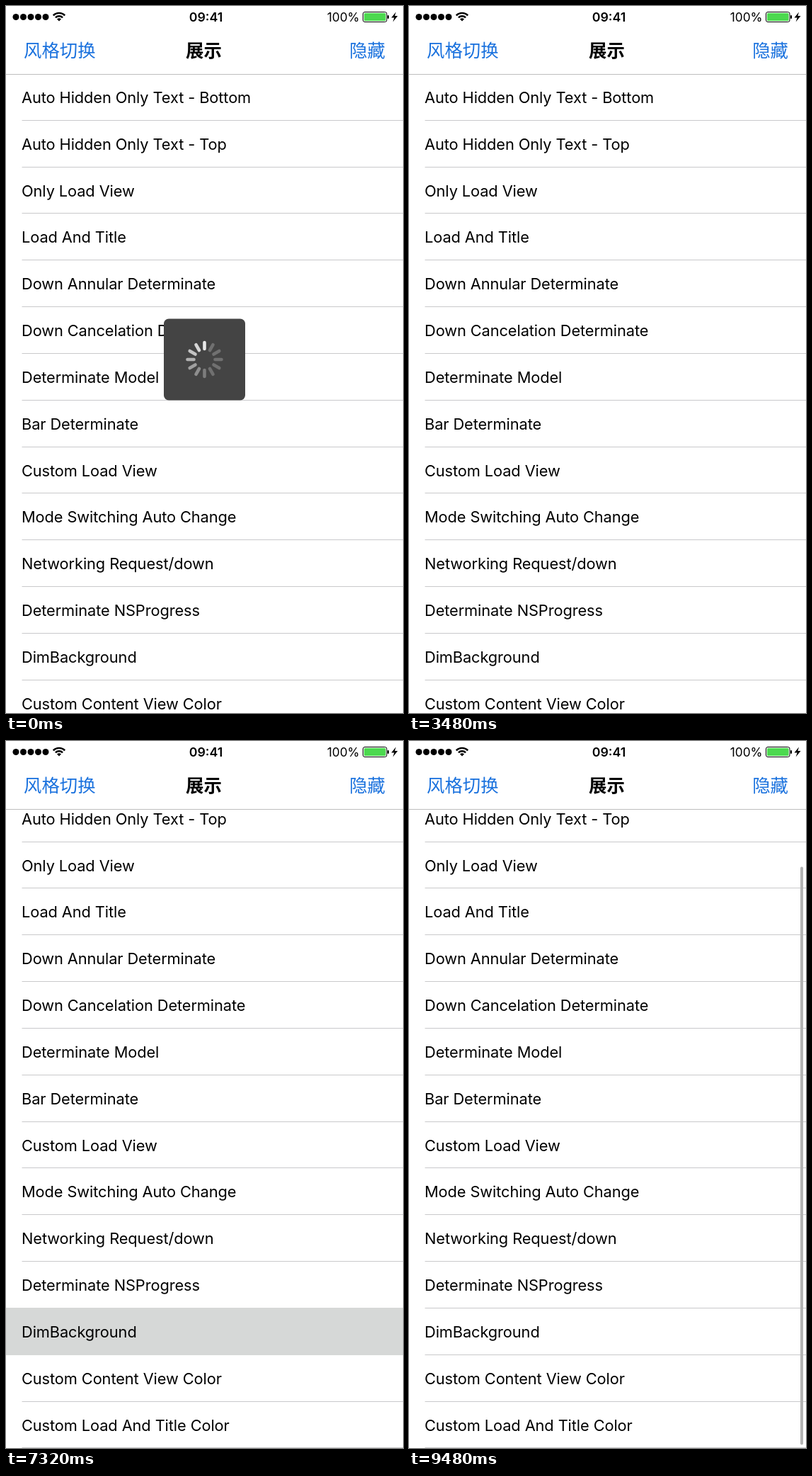
Write an HTML page with a canvas that moves like this. It is 561 px wide and 998 px high and loops after 9.6 s.

```html
<!DOCTYPE html>
<html lang="zh">
<head>
<meta charset="utf-8">
<style>
html, body { margin: 0; width: 100%; height: 100%; overflow: hidden; background: #fff; }
canvas { display: block; width: 561px; height: 998px; }
</style>
</head>
<body>
<canvas id="stage" width="561" height="998"></canvas>
<script>
const W = 561, H = 998, LOOP = 9600, STEP = 120;
const ROW_H = 65.824, NAV_H = 96, CX = 280.5, TAU = Math.PI * 2;
const LATIN = 'Inter, Roboto, sans-serif';
const CJK = '"Noto Sans CJK SC", "Noto Sans CJK", sans-serif';
const BLUE = '#1b72de';
const rows = [
  'Auto Hidden Only Text - Bottom', 'Auto Hidden Only Text - Top',
  'Only Load View', 'Load And Title', 'Down Annular Determinate',
  'Down Cancelation Determinate', 'Determinate Model', 'Bar Determinate',
  'Custom Load View', 'Mode Switching Auto Change',
  'Networking Request/down', 'Determinate NSProgress', 'DimBackground',
  'Custom Content View Color', 'Custom Load And Title Color'
];

const canvas = document.getElementById('stage');
const ratio = window.devicePixelRatio || 1;
canvas.width = W * ratio;
canvas.height = H * ratio;
const g = canvas.getContext('2d');

const clamp = v => Math.max(0, Math.min(1, v));
const ramp = (t, a, b) => clamp((t - a) / (b - a));
// Fades in from a to b, holds, fades out from c to d
const pulse = (t, a, b, c, d) => Math.min(ramp(t, a, b), 1 - ramp(t, c, d));

function text(str, x, y, font, color = '#000', align = 'left', spacing = 0) {
  g.font = font;
  g.fillStyle = color;
  g.textAlign = align;
  g.letterSpacing = spacing + 'px';
  g.fillText(str, x, y);
  g.letterSpacing = '0px';
}

function roundRect(x, y, w, h, r) {
  g.beginPath();
  g.roundRect(x, y, w, h, r);
}

function arc(x, y, r, from, to, width, color) {
  g.beginPath();
  g.arc(x, y, r, from, to);
  g.lineWidth = width;
  g.strokeStyle = color;
  g.stroke();
}

function drawStatus() {
  g.fillStyle = '#000';
  for (let i = 0; i < 5; i++) {
    g.beginPath();
    g.arc(14 + i * 10.5, 15.5, 4.5, 0, TAU);
    g.fill();
  }
  const up = -Math.PI / 2, half = Math.PI / 4;
  g.beginPath();
  g.moveTo(75, 21.5);
  g.arc(75, 21.5, 4.2, up - half, up + half);
  g.fill();
  for (const r of [7.2, 11.6]) arc(75, 21.5, r, up - half, up + half, 2.4, '#000');

  text('09:41', 282.5, 21.5, '600 17.8px ' + LATIN, '#000', 'center');
  text('100%', 499.5, 21.5, '17.3px ' + LATIN, '#000', 'right');

  roundRect(504.5, 8.5, 33.5, 14, 2.5);
  g.lineWidth = 1;
  g.strokeStyle = '#000';
  g.stroke();
  roundRect(506, 10, 30.5, 11, 1.5);
  g.fillStyle = '#4cd94f';
  g.fill();
  g.fillStyle = '#000';
  roundRect(539, 13, 2, 5, 1);
  g.fill();
  g.beginPath();
  [[551, 8.5], [544.5, 16.5], [548.6, 16.5], [546.6, 22.5], [553.5, 14], [549.4, 14]]
    .forEach(([x, y]) => g.lineTo(x, y));
  g.fill();
}

function drawNav() {
  g.fillStyle = '#fff';
  g.fillRect(0, 0, W, NAV_H);
  g.fillStyle = '#bdbdbd';
  g.fillRect(0, NAV_H, W, 1);
  drawStatus();
  text('风格切换', 25, 72.3, '25.4px ' + CJK, BLUE);
  text('展示', 279.5, 72.3, 'bold 25.4px ' + CJK, '#000', 'center');
  text('隐藏', 536, 72.3, '25.4px ' + CJK, BLUE, 'right');
}

function drawList(offset, selected, strength) {
  const line = i => Math.round(160.8 + i * ROW_H - offset);
  g.fillStyle = '#c9c9cb';
  rows.forEach((_, i) => g.fillRect(22.5, line(i), W, 1));
  if (strength > 0) {
    const top = line(selected - 1);
    g.globalAlpha = strength;
    g.fillStyle = '#d6d8d7';
    g.fillRect(0, top, W, line(selected) - top + (strength === 1 ? 1 : 0));
    g.globalAlpha = 1;
  }
  rows.forEach((label, i) =>
    text(label, 22, 137 + i * ROW_H - offset, '21.8px ' + LATIN, '#000', 'left', -0.1));
}

function drawBox(w, y, h) {
  roundRect(CX - w / 2, y, w, h, 7);
  g.fillStyle = '#444';
  g.fill();
}

function drawSpinner(y, t) {
  const head = Math.floor(t / (1000 / 12));
  g.lineCap = 'round';
  g.lineWidth = 4.6;
  for (let i = 0; i < 12; i++) {
    const age = ((head - i) % 12 + 12) % 12;
    const shade = Math.round(Math.max(112, 232 - age * 18));
    const a = i * TAU / 12 - Math.PI / 2;
    g.beginPath();
    g.moveTo(CX + Math.cos(a) * 15, y + Math.sin(a) * 15);
    g.lineTo(CX + Math.cos(a) * 24, y + Math.sin(a) * 24);
    g.strokeStyle = `rgb(${shade},${shade},${shade})`;
    g.stroke();
  }
  g.lineCap = 'butt';
}

function drawAnnular(y, p) {
  arc(CX, y, 26.2, 0, TAU, 3, '#575757');
  arc(CX, y, 26.2, -TAU / 4, -TAU / 4 + p * TAU, 3, '#fff');
}

function drawRound(y, p) {
  arc(CX, y, 26.2, 0, TAU, 3, '#fff');
  arc(CX, y, 24.7, -TAU / 4, -TAU / 4 + p * TAU, 6, '#fff');
}

function title(str, y) {
  text(str, CX, y, '600 23px ' + LATIN, '#fff', 'center');
}

function spinnerHud(t) {
  drawBox(115, 441.5, 115);
  drawSpinner(499, t);
}

function cancelHud(p) {
  drawBox(148, 401, 197);
  drawAnnular(458.5, p);
  title('loading', 515);
  roundRect(237, 528.2, 87, 39, 19.5);
  g.lineWidth = 1.5;
  g.strokeStyle = '#fff';
  g.stroke();
  text('cancel', CX, 554.3, '600 18px ' + LATIN, '#fff', 'center');
}

function roundHud(w, label, p) {
  drawBox(w, 424.3, 150);
  drawRound(482, p);
  title(label, 538);
}

function switchHud(t) {
  if (t >= 4320) return roundHud(224, 'loading...', ramp(t, 4320, 5400));
  drawBox(224, 424.3, 150);
  drawSpinner(482, t);
  title('loading...', 538);
}

function requestProgress(t) {
  return t < 6480 ? 0.025 + 0.4 * ramp(t, 6000, 6240) : 0.425 + 0.575 * ramp(t, 6360, 6720);
}

const huds = [
  { from: 0, to: 600, alpha: t => 1 - ramp(t, 360, 600), draw: spinnerHud },
  { from: 720, to: 2280, alpha: t => pulse(t, 600, 840, 2040, 2280),
    draw: t => cancelHud(Math.max(0, t - 935) / 5000) },
  { from: 2400, to: 3480, alpha: t => pulse(t, 2280, 2520, 3240, 3480),
    draw: t => roundHud(148, 'loading', ramp(t, 2400, 3240)) },
  { from: 3600, to: 5640, alpha: t => pulse(t, 3480, 3720, 5400, 5640), draw: switchHud },
  { from: 6000, to: 6840, alpha: () => 1,
    draw: t => roundHud(224, 'loading...', requestProgress(t)) },
  { from: 7440, to: 8880, alpha: t => pulse(t, 7320, 7680, 8520, 8880), dim: 0.2, draw: spinnerHud }
];

// Tapped rows: index, first shown, start of fade, end of fade
const taps = [
  [5, 600, 720, 1080], [6, 2280, 2400, 2760],
  [10, 6000, 5700, 6213], [12, 7320, 7320, 7680]
];

function render(t) {
  g.setTransform(ratio, 0, 0, ratio, 0, 0);
  g.globalAlpha = 1;
  g.fillStyle = '#fff';
  g.fillRect(0, 0, W, H);

  const tap = taps.find(([, start, , end]) => t >= start && t < end);
  drawList(t >= 7200 ? 85 : 0, tap ? tap[0] : 0, tap ? 1 - ramp(t, tap[2], tap[3]) : 0);

  const bar = ramp(t, 8880, 9240);
  if (bar > 0) {
    g.globalAlpha = bar;
    g.fillStyle = '#b2b2b2';
    roundRect(553, 177.5, 4, 816, 2);
    g.fill();
    g.globalAlpha = 1;
  }
  drawNav();

  const hud = huds.find(h => t >= h.from && t < h.to);
  if (!hud) return;
  const alpha = hud.alpha(t);
  if (hud.dim) {
    g.fillStyle = `rgba(0,0,0,${hud.dim * alpha})`;
    g.fillRect(0, 0, W, H);
  }
  g.globalAlpha = alpha;
  hud.draw(t);
  g.globalAlpha = 1;
}

const begin = performance.now();
function tick() {
  const t = (performance.now() - begin) % LOOP;
  render(Math.floor(t / STEP) * STEP);
  requestAnimationFrame(tick);
}
tick();
</script>
</body>
</html>
```
